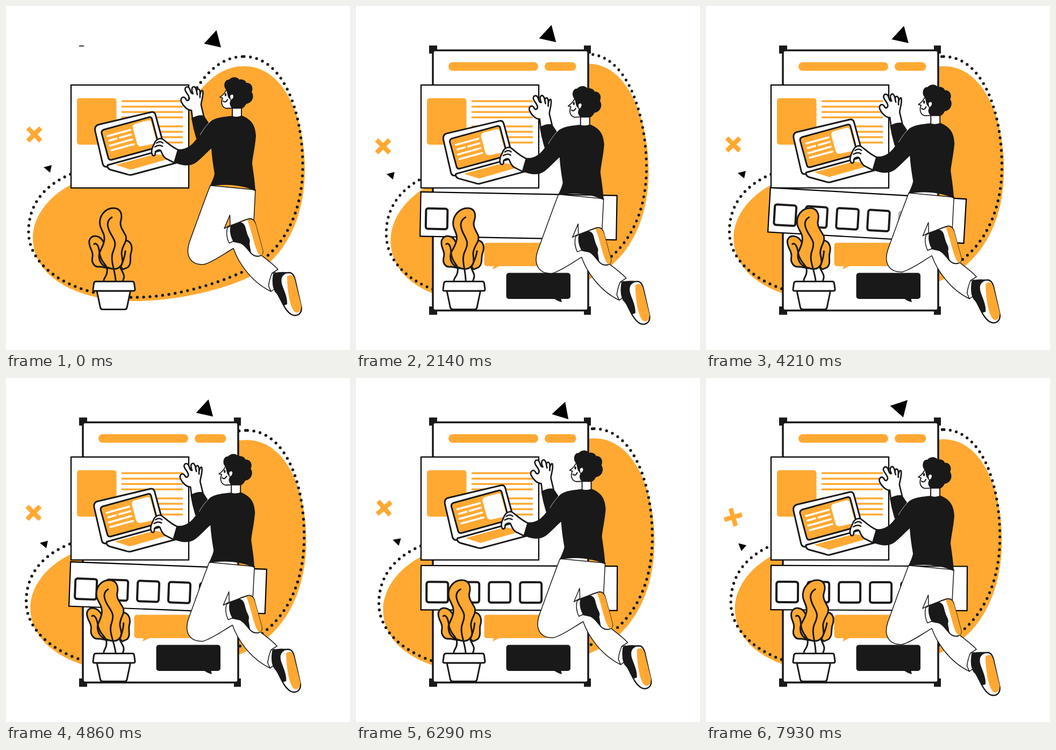
These frames come from a looping animation (640x640 px, 8 s). An HTML page:

```html
<!DOCTYPE html>
<html lang="en">
<head>
<meta charset="utf-8">
<title>Building a page</title>
<style>
  html, body { margin: 0; width: 100%; height: 100%; overflow: hidden; background: #fff; }
  svg { display: block; width: 100%; height: 100%; }
  .o { fill: #ffa933; }
  .k { fill: #191919; }
  .w { fill: #fff; }
  .n { fill: none; }
  .line { stroke: #191919; stroke-width: 3; stroke-linecap: round; stroke-linejoin: round; }
  .thin { stroke: #191919; stroke-width: 1.5; stroke-linejoin: round; }
  .box { fill: #fff; stroke: #000; stroke-width: 2.2; }
</style>
</head>
<body>
<svg viewBox="0 0 640 640">
  <defs>
    <clipPath id="pageClip"><rect id="pageWipe" x="136" y="73"/></clipPath>
    <clipPath id="stripClip"><rect id="stripWipe" x="118" y="345" height="92"/></clipPath>
  </defs>

  <g id="blob">
    <path class="o" d="M443 112C516 112 556 205 556 305C556 400 515 478 440 510C380 535 300 549 240 549C130 549 50 503 50 432C50 385 90 340 150 320C250 290 290 245 325 205C355 165 385 112 443 112Z"/>
    <path class="n" stroke="#191919" stroke-width="5.4" stroke-linecap="round" stroke-dasharray="0 11.8"
      d="M443 94C515 94 552 195 552 298C552 390 512 465 435 497C385 519 310 542 240 542C130 542 42 490 42 420C42 360 82 322 150 302C250 275 290 240 330 195C355 150 385 94 443 94"/>
  </g>

  <g clip-path="url(#pageClip)">
    <path class="k" d="M136 73.5h15v15h-15zM424 73.5h13v15h-13zM136 559h15v15.500h-15zM424 559h13v15.500h-13z"/>
    <rect class="w" x="143" y="82.500" width="289" height="484" rx="4" stroke="#191919" stroke-width="3.500"/>
    <rect class="o" x="172" y="104.500" width="167" height="16" rx="8"/>
    <rect class="o" x="351" y="104.500" width="58.500" height="16" rx="8"/>
    <rect class="o" x="238.500" y="440.500" width="119" height="43.500" rx="5"/>
    <path class="o" d="M257 482L254 490L271 482Z"/>
    <rect class="k" x="279.500" y="496.500" width="119.500" height="48.500" rx="5"/>
    <path class="k" d="M367 543Q374 549 383 551L381 543Z"/>
  </g>

  <rect class="box" x="121" y="147" width="219" height="191.500"/>
  <rect class="o" x="132" y="171.500" width="73.500" height="86.500" rx="5"/>
  <path class="n" stroke="#ffa933" stroke-width="3.600" d="M215 177h114M215 187.200h114M215 197.200h114M215 207.300h114M215 224h114M215 234h114M215 244h114M215 254h114"/>

  <g id="strip">
    <g clip-path="url(#stripClip)">
      <rect class="box" x="121.200" y="349.600" width="365" height="82.500"/>
      <g id="cells"></g>
    </g>
  </g>

  <g id="plant" class="line">
    <path class="o" d="M182 440C175 426 160 424 155 436C153 450 163 455 161 466C158 478 165 487 175 485L192 488L186 445Z"/>
    <path class="o" d="M221 436C232 436 236 447 233 458C229 468 235 478 227 486L218 490L208 480Z"/>
    <path class="o" d="M200 376C185 376 172 390 175 408C178 420 186 425 182 440C178 455 170 458 174 472C177 481 184 486 191 487C198 490 203 490 208 488C221 480 216 472 215 460C215 446 226 440 223 428C218 417 210 410 214 398C217 386 212 376 200 376Z"/>
    <path class="n" d="M197 393C186 400 188 410 194 422C202 436 206 440 200 455C192 472 203 490 204 511M164 443C169 439 173 448 174 460C177 480 190 480 188 494C188 503 181 506 182 512M222 456C221 470 216 478 213 487C217 497 223 501 217 512"/>
  </g>
  <path class="w line" d="M169 530L175.500 561Q176.500 564.500 180 564.500H221Q224 564.500 225 561L231.500 530Z"/>
  <path class="w line" d="M168 512.500H235Q238 512.500 238.500 516L240 527Q240 530 237 530H164.500Q161.500 530 162 527L163.500 516Q164 512.500 168 512.500Z"/>

  <g id="person">
    <path class="w line" d="M171 221L270 197.500Q276 196 278 202L291 250L293 270L188 299Q182 300 180 294L166 233Q164 224 171 221Z"/>
    <path class="o line" d="M182 230L266 207Q270 206 271.500 210L284 258Q284.500 262 281 263L197 286Q192 287 190.500 283L178 237Q177 232 182 230Z"/>
    <path class="w" d="M241 219L264 213Q269 212 270.500 217L279.500 250Q280.500 255 276 256L252 261Q246 262 244 256L236 227Q235 221 241 219Z"/>
    <path class="n" stroke="#fff" stroke-width="3.500" stroke-linecap="round" d="M189 242L231 230.500M192 250.500L206 246.500M212 245L233 239M193 260L235 248M196 268.500L238 257"/>
    <path class="w line" d="M189 296L290 268L330 279Q335 287 318 291.500L234 314Q229 315 225 313L194 304.500Q188 302 189 296Z"/>
    <path class="o" d="M204 295.500L278 275.500L313 281.500L232 304.500Z"/>

    <path class="w thin" fill-rule="evenodd" d="M380 334C366 370 352 410 341 440C334 462 341 482 368 481C386 476 404 462 423 451C432 476 455 513 493 531L489 519L495 497L506 490C495 478 480 468 470 460L461 400L464 342ZM406 414L416.500 389L417 408Z"/>
    <path class="w thin" d="M412 412Q408 426 415 441L425 437L421 408Z"/>
    <path class="w line" style="stroke-width:2" d="M419 408C432 404 443 398 452 396C459 395 463 399 465 409L477.500 455C480 466 466 469 457 461C449 453 446 445 437 441L423 438Z"/>
    <path class="k" d="M418 409L436 402C446 405 445 412 448 421C450 430 456 434 453 442L456 460C449 452 446 443 433 440L424 439C418 432 415 418 418 409Z"/>
    <path class="o" d="M449 398.500C457 394 463 399 465.500 410L477.500 454C479 463 474 467 470 461C462 449 458 420 449 398.500Z"/>
    <path class="w thin" d="M495 497Q490 508 488.500 521L493 531L503 524L502 496Z"/>
    <path class="w line" style="stroke-width:2.400" d="M498 499C508 494 518 497 526 496C534 496 537 503 539 514L549.500 560C551 572 542 579 531 574C518 566 513 548 505 535Q494 526 498 499Z"/>
    <path class="k" d="M498 498C508 494 514 496 523 497C515 500 511 505 513 516C516 528 524 540 523 555L517 557C509 547 508 538 500 531Q494 518 498 498Z"/>
    <path class="o" d="M523 503C530 498 536 500 538.500 514L549.500 558C549 568 543 573 537 569C526 557 523 520 523 503Z"/>

    <g id="arm">
      <path class="w line" style="stroke-width:2.700" d="M347 210L345 194C338 194 330 187 326 178C324 171 330 167 334 172C336 177 339 177 341 173C342 166 334 162 333 155C334 149 340 149 342 155C344 162 346 164 348 163C344 155 346 150 350 150C355 152 354 160 356 165C353 157 356 153 359 155C363 158 360 165 361 170C360 162 364 155 366 158C368 166 363 178 363 184L368 205Z"/>
      <path class="k" d="M345 209Q356 202 368 203.500L377 217L365 243L354 247Q348 228 345 209Z"/>
    </g>

    <path class="w line" style="stroke-width:2" d="M421 186V206Q429 209 438 205V186Z"/>
    <path class="k" d="M381 214C392 207 406 206 420 204.500Q430 208 439 204C456 211 464 221 465 242C463 265 459 280 458 293C460 308 463 326 464 344.500C440 333 410 330 379 335.500C384 325 387 318 388 312C385 295 383 280 382 265C373 273 364 283 354 291C342 299 330 298 311 290.500Q313 276 319 266C331 268 342 262 350 253C360 241 370 224 381 214Z"/>
    <path class="n" stroke="#fff" stroke-width=".7" d="M361 240Q370 224 382 213"/>

    <path class="w line" style="stroke-width:2.700" d="M319 267C308 262 300 254 292 248C286 244 278 249 276 256C271 265 269 273 273 278C277 280 278 276 278 271C281 268 285 267 288 269C291 277 294 282 298 284L312 291"/>
    <path class="n line" style="stroke-width:2.400" d="M280 255Q287 250 292 255M277 262Q285 257 291 261"/>

    <path class="w line" style="stroke-width:1.800" d="M411 154C408 161 404 166 398 169.500L403 171C399 180 402 189 410 190.500L421 190L432 180V156Z"/>
    <path class="k" d="M410 156C404 151 405 137 415 137C420 131 430 131 434 137C441 135 447 140 447 143C457 142 461 153 457 160C463 168 458 181 447 182C444 188 440 191 437 191L421 191C416 185 415 180 418 176L413 169Z"/>
    <path class="w" d="M417 167Q422 162 423 168Q422 174 418 174Z"/>
    <ellipse class="k" cx="408.500" cy="165" rx="1.700" ry="3"/>
    <path class="n line" style="stroke-width:2.200" d="M404 177Q409 181 412 174"/>
  </g>

  <path id="bigTri" d="M5-19L-18 6L13.500 13Z"/>
  <path id="smallTri" d="M-9-2L6-6L3 8Z"/>
  <path id="cross" class="n" stroke="#ffa933" stroke-width="8.500" d="M-12-12L12 12M12-12L-12 12"/>
</svg>
<script>
const LOOP = 8000, FLOAT = 3000;
const el = id => document.getElementById(id);
const clamp01 = v => Math.min(1, Math.max(0, v));
const place = (id, value) => el(id).setAttribute('transform', value);

// Smooth curve through [time, value] steps
function curve(steps) {
  const slope = i => {
    const a = steps[Math.max(0, i - 1)], b = steps[Math.min(steps.length - 1, i + 1)];
    return (b[1] - a[1]) / (b[0] - a[0]);
  };
  return t => {
    if (t <= steps[0][0]) return steps[0][1];
    const i = steps.findIndex(s => s[0] >= t);
    if (i < 0) return steps[steps.length - 1][1];
    const [t0, v0] = steps[i - 1], [t1, v1] = steps[i];
    const d = t1 - t0, u = (t - t0) / d, r = 1 - u;
    return r * r * ((1 + 2 * u) * v0 + u * d * slope(i - 1))
         + u * u * ((1 + 2 * r) * v1 - r * d * slope(i));
  };
}

const blobWidth = curve([[0, 1], [600, 1.02], [1290, .984], [2100, .957], [3070, .974], [4210, .994],
  [5000, 1.011], [5570, 1.014], [6100, 1.008], [7070, .948], [7930, .978], [8000, .982]]);
const blobTurn = curve([[0, 0], [600, 1.5], [1290, -.4], [2100, -1.8], [3070, -1.5], [4210, 0],
  [5570, 2], [7070, -1.9], [7930, .8], [8000, 1]]);
const sway = curve([[0, 0], [1290, 1], [2100, 1.15], [3070, .8], [4210, -.95], [4900, -1.2],
  [5570, -1.05], [7070, .25], [7930, 1.05], [8000, 1.1]]);
const stripTurn = curve([[1450, 0], [3070, 2.35], [4210, 3.3], [5570, .75], [7070, 0], [7930, .3]]);
const wave = curve([[1000, 0], [1070, 1.8], [1290, 9.5], [1400, 11], [1570, 8.2], [1900, .5], [2000, 0]]);

const cells = Array.from({ length: 5 }, (_, i) => {
  const cell = document.createElementNS('http://www.w3.org/2000/svg', 'rect');
  const attrs = { x: 131.5 + 58 * i, y: 380, width: 40, height: 38, rx: 4,
    fill: '#fff', stroke: '#191919', 'stroke-width': 4 };
  for (const name in attrs) cell.setAttribute(name, attrs[name]);
  return el('cells').appendChild(cell);
});

function draw(t) {
  const phase = t / FLOAT % 2;
  const k = phase < 1 ? phase : 2 - phase;
  const spin = Math.max(0, t - 2 * FLOAT) * .015;

  place('person', `translate(${-4.6 * k} ${23 * k})`);
  place('arm', `rotate(${-wave(t % 2000)} 363 240)`);
  place('bigTri', `translate(${386.5 - 39 * k} ${64 - 13.5 * k}) rotate(${spin})`);
  place('smallTri', `translate(${79 - 18.5 * k} ${302 + 18 * k}) rotate(${spin})`);
  place('cross', `translate(${52.5 - 3 * k} ${239 + 31 * k}) rotate(${spin})`);

  place('blob', `translate(297 318) rotate(${blobTurn(t)}) scale(${blobWidth(t)} 1) translate(-297 -318)`);
  const shear = .049 * sway(t);
  place('plant', `matrix(1 0 ${-shear} 1 ${512 * shear} 0)`);

  const reveal = clamp01(t / 1865);
  el('pageWipe').setAttribute('width', 9 + 293 * reveal);
  el('pageWipe').setAttribute('height', 2 + 501 * reveal);

  place('strip', `rotate(${stripTurn(t)} 320 320)`);
  el('stripWipe').setAttribute('width', 371 * clamp01((t - 1450) / 400));
  cells.forEach((cell, i) => cell.setAttribute('opacity', clamp01((t - 1700 - 615 * i) / 150)));
}

const start = performance.now();
function tick() {
  draw((performance.now() - start) % LOOP);
  requestAnimationFrame(tick);
}
tick();
</script>
</body>
</html>
```
